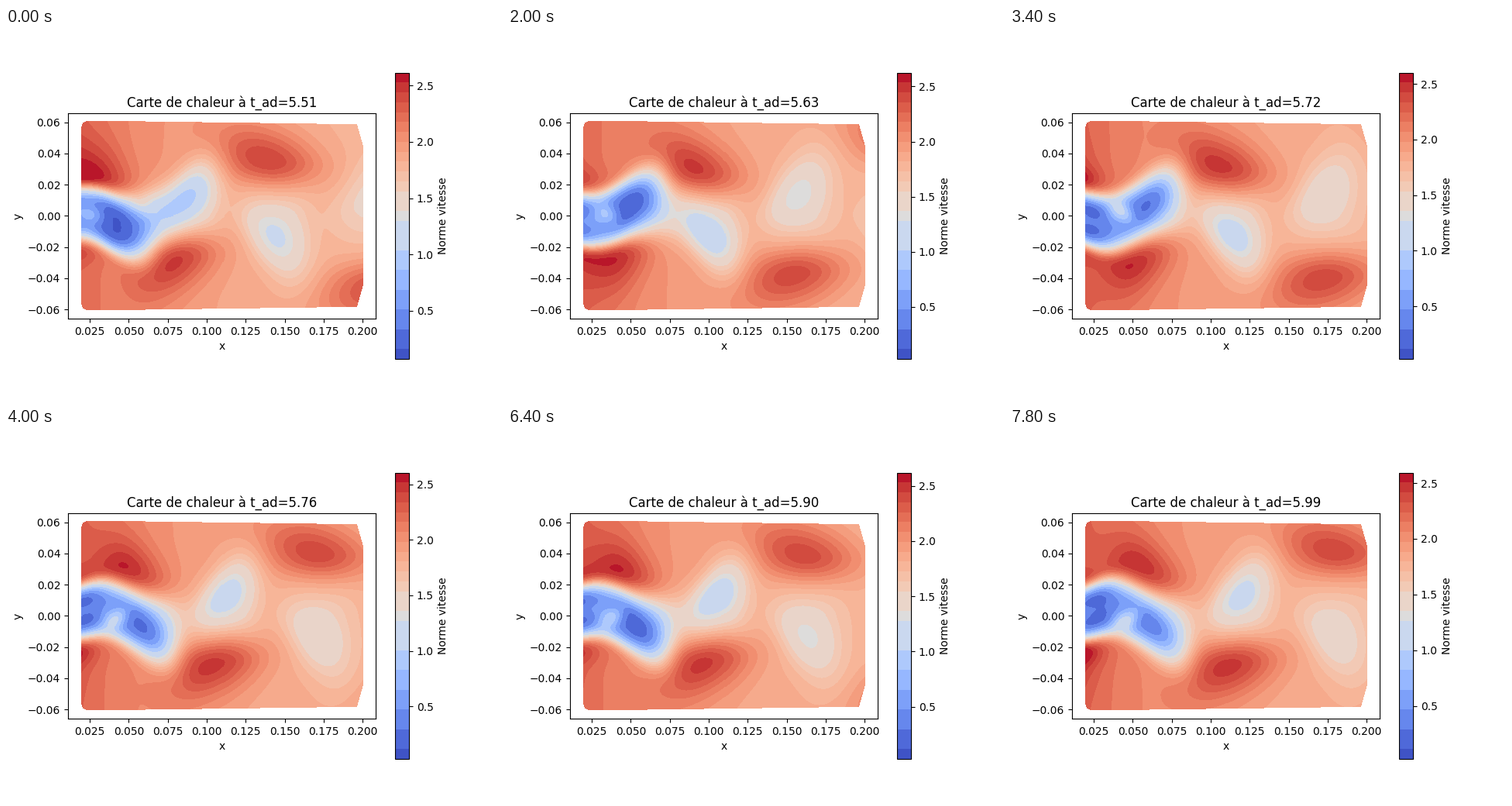
Animation, 640 px wide and 480 px high, one loop 8000 ms. Source, as a matplotlib script:

```python
import matplotlib.pyplot as plt
import numpy as np
from matplotlib.animation import FuncAnimation
from matplotlib.colors import ListedColormap
from matplotlib.path import Path

FRAMES, STEP_MS = 40, 200
PERIOD = 6.2            # frames per shedding cycle
SCALE = 2010.8          # pixels per unit of x and y
X_MIN, X_MAX, Y_MAX = 0.01098, 0.20831, 0.066
LEFT = 97               # first pixel column of the field
BANDS = 29
TAU = 2 * np.pi

# Pixel grid: x across the stage, y upwards from the wake axis.
px = np.arange(LEFT, 460) + 0.5
py = np.arange(-122, 123.0)
X, Y = np.meshgrid(px, py)
d = (px - LEFT) / 100   # distance behind the body


def fade(mid, power):
    """Falls smoothly from 1 at the body to 0 far downstream."""
    return 1 / (1 + (d / mid)**power)


def age(x, start, speed, accel):
    """Cycles a structure needs to drift from start to x."""
    return (np.sqrt(speed**2 + 4 * accel * (x - start)) - speed) / (2 * accel)


def hull_mask():
    top = [(97.4, 114.5), (99.5, 119.5), (106, 122), (452, 117.3), (460, 89)]
    outline = Path(top + [(x, -y) for x, y in reversed(top)])
    inside = outline.contains_points(np.column_stack([X.ravel(), Y.ravel()]))
    return ~inside.reshape(X.shape)


def banded_cmap():
    # The cool half has coarser steps than the warm half.
    band = np.arange(float(BANDS))
    band[1:11] = np.repeat(np.arange(1.5, 11, 2), 2)
    band[11:14] = 12
    band[15:17] = 15.5
    return ListedColormap(plt.get_cmap("coolwarm")((band + 0.5) / BANDS))


OUTSIDE = hull_mask()

# Free stream, faster next to the body.
STREAM = 1.76 + 0.49 * np.exp(-d / 1.5)
EDGE_JET = 0.15 * np.exp(-(d / 0.25)**2 - ((np.abs(Y) - 47) / 16)**2)

# Slow, meandering wake.
LEAN = 0.3 * (1 - fade(0.6, 4))
WAKE_AGE = age(X - LEAN * (np.sqrt(Y**2 + 200) - 25), 237, 205, 35)
SWAY = 28 * np.tanh(0.22 + 0.75 * d)
LAG = 0.6 * fade(1.6, 4)
WIDTH = 34 + 7 * d
POWER = 2 + 2 * fade(0.6, 4)
CREST = 1.2 - 0.24 * d + 0.9 * fade(1.08, 7)
NODE = CREST * (0.2 + 0.65 * fade(1.15, 6))
CORE = 0.2 * np.exp(-(d / 0.25)**2)
EDDY = 0.65 * np.exp(-((d - 0.5) / 0.35)**2)

# Fast patches outside the vortices.
JET_PATH = 110, 190, 39
JET_AGE = age(px, *JET_PATH)
JET_Y = 46 + 8 * JET_AGE + 15 * JET_AGE**2
JET_GAIN = 0.59 - 0.22 * fade(0.5, 3)
JET_LEAN = 0.8 - 0.6 * fade(0.9, 3)
JET_INNER = 38 - 18 * fade(0.7, 2)


def jets(phase, side):
    off = side * Y - JET_Y
    theta = TAU * (phase - age(X + JET_LEAN * off, *JET_PATH))
    width = np.where(off < 0, JET_INNER, 52)
    pulse = ((1 + np.cos(theta)) / 2)**2
    return JET_GAIN * pulse * np.exp(-(off / width)**2)


def wake(phase):
    theta = TAU * (phase - WAKE_AGE)
    mid = SWAY * np.cos(theta + LAG)
    off = np.abs(Y - mid)
    depth = NODE + (CREST - NODE) * np.cos(theta)**2
    core = CORE * np.exp(-(off / 9)**2)
    eddy = EDDY * np.sin(theta)**4 * np.exp(-((Y + 0.7 * mid) / 12)**2)
    return depth * np.exp(-(off / WIDTH)**POWER) - core - eddy


def limits(phase):
    low = 0.025 + 0.045 * np.maximum(0, np.cos(2 * TAU * phase))**2
    high = 2.608 + 0.018 * np.cos(2 * TAU * (phase - 0.09))
    return low, high


def speed(phase):
    v = STREAM + EDGE_JET + jets(phase, 1) + jets(phase + 0.5, -1)
    v = np.clip(v - wake(phase), *limits(phase))
    return np.ma.array(v, mask=OUTSIDE)


fig, ax = plt.subplots(figsize=(6.4, 4.8), dpi=100)
left = X_MIN + (LEFT - 80) / SCALE
half = len(py) / 2 / SCALE
im = ax.imshow(speed(0), cmap=banded_cmap(), origin="lower",
               interpolation="nearest",
               extent=(left, left + len(px) / SCALE, -half, half))
im.set_clim(*limits(0))
ax.set_xlim(X_MIN, X_MAX)
ax.set_ylim(-Y_MAX, Y_MAX)
ax.set_xlabel("x")
ax.set_ylabel("y")
title = ax.set_title("")
fig.colorbar(im, ax=ax, label="Norme vitesse")


def draw(n):
    phase = n / PERIOD
    im.set_data(speed(phase))
    im.set_clim(*limits(phase))
    title.set_text(f"Carte de chaleur à t_ad={5.51 + 0.0123 * n:.2f}")
    return im, title


anim = FuncAnimation(fig, draw, frames=FRAMES, interval=STEP_MS,
                     repeat=True, repeat_delay=0)
plt.show()
```
